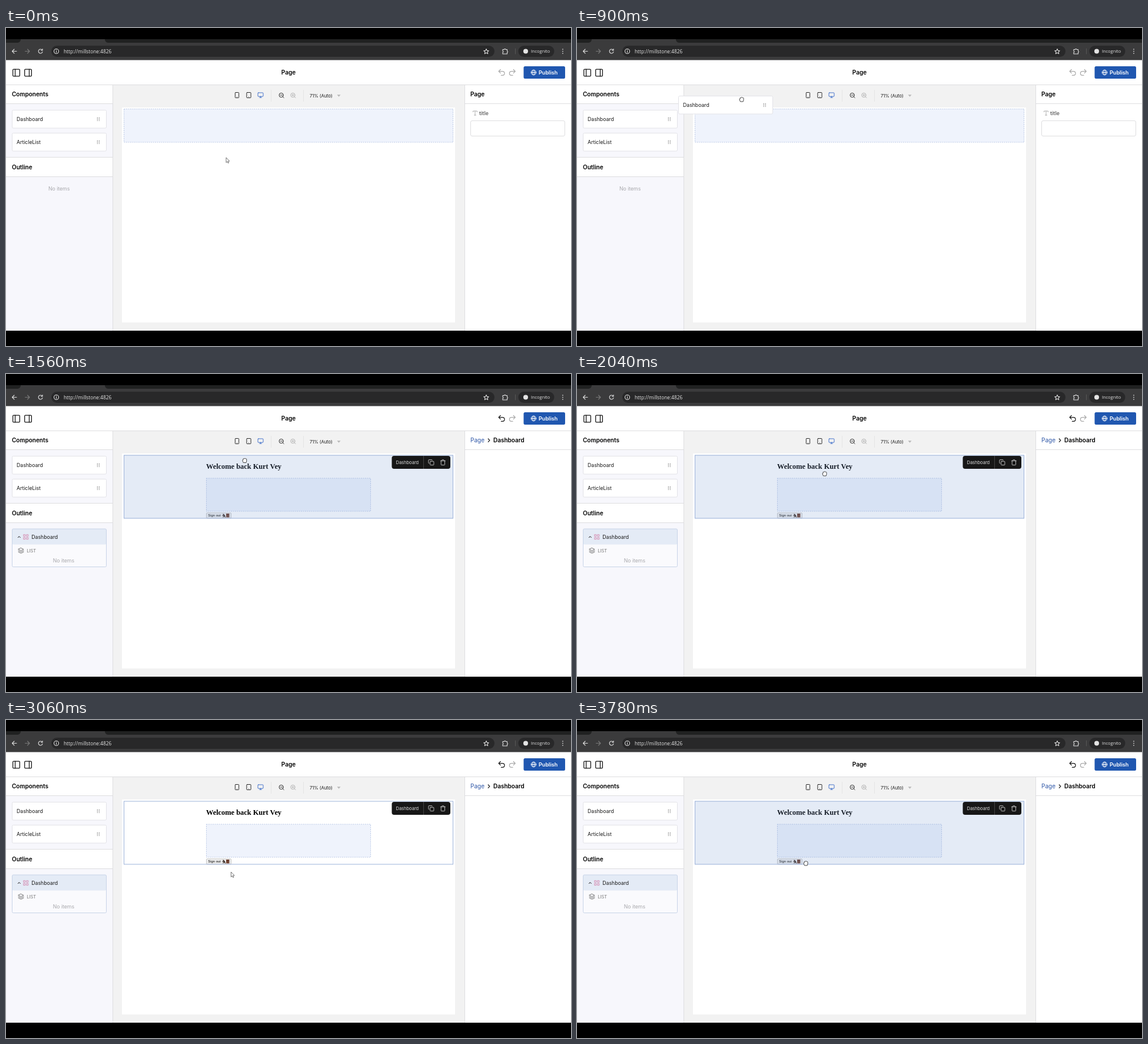
Write an HTML page that moves like this. It is 960x540 px and loops after 4.29 s.

```html
<!DOCTYPE html>
<html lang="en">
<head>
<meta charset="utf-8">
<title>Page editor</title>
<style>
  html, body { margin: 0; width: 100%; height: 100%; overflow: hidden; background: #000; }
  svg { display: block; width: 960px; height: 540px; }
  text { font: 400 8.7px Inter, sans-serif; fill: #181818; white-space: pre; }
  .head { font-size: 10px; font-weight: 600; fill: #000; }
  .small { font-size: 7.5px; }
  .chrome { font: 8.3px "Open Sans", sans-serif; fill: #e4e4e4; }
  .soft { fill: #a8a8ac; }
  .icon { fill: none; stroke: #181818; stroke-width: 2; stroke-linecap: round; stroke-linejoin: round; }
  .card rect { fill: #fff; stroke: #e3e3e8; }
  .zone { fill: #eff3fc; stroke: #bccae6; stroke-dasharray: 2 1.5; }
</style>
</head>
<body>
<svg viewBox="0 0 960 540">
  <defs>
    <path id="grip" d="M0 0h0M3 0h0M0 2.4h0M3 2.4h0M0 4.8h0M3 4.8h0" fill="none" stroke="#555" stroke-width="1.3" stroke-linecap="round"/>
    <path id="back" d="M9 14 4 9l5-5M4 9h10.5a5.5 5.5 0 0 1 0 11H11"/>
    <path id="lens" d="M19 11a8 8 0 1 1-16 0a8 8 0 1 1 16 0M21 21l-4.3-4.3M8 11h6"/>
  </defs>

  <!-- browser bar -->
  <rect width="960" height="540"/>
  <rect y="19" width="960" height="8" fill="#202121"/>
  <path d="M20 25q5-1 5-6h143q0 5 5 6z" fill="#3b3b3c"/>
  <rect y="25" width="960" height="30" fill="#3b3b3c"/>
  <rect x="77" y="30" width="753" height="19" rx="9.5" fill="#282829"/>
  <rect x="870.500" y="30" width="61" height="19" rx="9.5" fill="#282829"/>
  <g class="icon" style="stroke:#ddd;stroke-width:1.1">
    <path d="M18 39.500h-7.500m3.500-3.500l-3.500 3.500l3.500 3.500"/>
    <path d="M32.500 39.500h7.500m-3.500-3.500l3.500 3.500l-3.500 3.500" stroke="#777"/>
    <path d="M61.500 37.500a3.500 3.500 0 1 0 .5 3M62 35.500v2.500h-2.500"/>
    <circle cx="85.500" cy="39.500" r="4"/>
    <path d="M85.500 39v2.500M85.500 37.300v.1"/>
    <path d="M816 35.500l1.300 2.900 3 .3-2.300 2 .7 3-2.700-1.600-2.700 1.600.7-3-2.300-2 3-.3z"/>
    <path d="M844 36.500h2.500a1.300 1.300 0 0 1 2.500 0h2.500v2.500a1.300 1.300 0 0 1 0 2.500v2.500h-7.500v-2.500a1.300 1.300 0 0 0 0-2.500z"/>
    <path d="M865.500 35v9" stroke="#555"/>
    <path d="M946 36v.1M946 39.500v.1M946 43v.1" stroke-width="1.700"/>
  </g>
  <circle cx="883" cy="39.500" r="4" fill="#e4e4e4"/>
  <text class="chrome" x="98" y="42.700">http://millstone:4826</text>
  <text class="chrome" x="892" y="42.300" style="font-size:7.400px">Incognito</text>

  <!-- editor frame -->
  <rect y="54.500" width="960" height="459.500" fill="#fff"/>
  <rect y="97" width="181" height="417" fill="#f7f7fc"/>
  <rect x="181" y="97" width="599" height="417" fill="#f2f2f2"/>
  <rect x="197" y="135" width="566" height="365" fill="#fff"/>
  <path d="M0 97h181v31H0zM0 220h181v32H0z" fill="#fff"/>
  <path d="M0 96.500h960M0 128.500h181M0 219.500h181M0 252.500h181M181.500 97v417M779.500 97v417M780 128.500h180" stroke="#dedee0"/>
  <g class="icon" transform="translate(9.700 68.200) scale(.65)">
    <rect x="3" y="3" width="18" height="18" rx="2"/><path d="M9 3v18"/>
    <g transform="translate(30.800)"><rect x="3" y="3" width="18" height="18" rx="2"/><path d="M15 3v18"/></g>
  </g>
  <text class="head" x="480" y="78.700" text-anchor="middle">Page</text>
  <g class="icon" transform="translate(834.600 68) scale(.62)"><use id="undo" href="#back"/></g>
  <g class="icon" transform="translate(867.800 68) scale(-.62 .62)" style="stroke:#aaa"><use href="#back"/></g>
  <rect x="879.500" y="65" width="70.500" height="21" rx="2.500" fill="#2057b0"/>
  <g class="icon" style="stroke:#fff;stroke-width:1"><circle cx="896.500" cy="75.500" r="4.200"/><ellipse cx="896.500" cy="75.500" rx="1.800" ry="4.200"/><path d="M892.300 75.500h8.400"/></g>
  <text x="905" y="78.800" style="font-size:9.100px;font-weight:600;fill:#fff">Publish</text>

  <text class="head" x="10" y="116.200">Components</text>
  <text class="head" x="10" y="239.700">Outline</text>
  <g id="card" class="card">
    <rect x="10.500" y="139.500" width="160" height="30.500" rx="2"/>
    <text x="18" y="158.200">Dashboard</text>
    <use href="#grip" x="155.300" y="152.300"/>
  </g>
  <g class="card">
    <rect x="10.500" y="178.500" width="160" height="30.500" rx="2"/>
    <text x="18" y="197.200">ArticleList</text>
    <use href="#grip" x="155.300" y="191.300"/>
  </g>

  <!-- viewport controls -->
  <g class="icon" transform="translate(387.100 108.600) scale(.45)">
    <rect x="5" y="2" width="14" height="20" rx="2"/><path d="M12 18h.01"/>
    <g transform="translate(44.400)"><rect x="4" y="2" width="16" height="20" rx="2"/><path d="M12 18h.01"/></g>
    <g transform="translate(88.900)" stroke="#3668c8"><rect x="2" y="3" width="20" height="14" rx="2"/><path d="M8 21h8M12 17v4"/></g>
    <use href="#lens" x="168" y="1"/>
    <g stroke="#aaa"><use href="#lens" x="212" y="1"/><path d="M223 9v6"/></g>
  </g>
  <path d="M450.500 105v20M505.500 105v20" stroke="#e4e4e4"/>
  <text class="small" x="516" y="117.500">71% (Auto)</text>
  <path d="M562.500 113.200h6l-3 3.500z" fill="#b8b8b8"/>

  <!-- empty page -->
  <g id="empty">
    <rect class="zone" x="200.500" y="137.500" width="559" height="56.500"/>
    <text class="soft" x="72" y="276.200">No items</text>
    <text class="head" x="789" y="116.200">Page</text>
    <path d="M793.500 142.500v-1.500h7v1.500M797 141v7M795.500 148h3" class="icon" style="stroke:#aaa;stroke-width:.9"/>
    <text x="804" y="147.500" style="font-weight:600;fill:#666">title</text>
    <rect x="789.500" y="157.500" width="160" height="26" rx="2.500" fill="#fff" stroke="#dedee0"/>
  </g>

  <!-- page with the dropped component -->
  <g id="filled">
    <text x="340" y="161" style="font:bold 12.370px 'Liberation Serif',serif;fill:#000">Welcome back Kurt Vey</text>
    <rect class="zone" x="340.500" y="177" width="279" height="56"/>
    <rect x="340.500" y="235.800" width="42" height="9" rx="1" fill="#efefef" stroke="#b5b5b5" stroke-width=".7"/>
    <text x="343.300" y="242.400" style="font:5.900px 'Liberation Sans',sans-serif;fill:#000">Sign out</text>
    <path d="M369 238l1.500 1 1.500 2M370 239l-2 1.500M370.500 240l-1.500 3M370.500 241l2 2" class="icon" style="stroke:#3a2d28;stroke-width:1.200"/>
    <rect x="374" y="237" width="5.500" height="6.500" fill="#7b4a38"/>
    <path d="M375.500 238.500h2.500M375.500 241h2.500" stroke="#4f2c22"/>
    <rect id="hover" x="200" y="137.500" width="560" height="108" fill="rgb(120,155,210)" fill-opacity=".2"/>
    <rect x="200.500" y="138" width="559" height="107" fill="none" stroke="#9db3da"/>

    <rect x="655.500" y="139" width="99.500" height="22" rx="4" fill="#171717"/>
    <path d="M709.500 139v22" stroke="#444"/>
    <text class="small" x="662.500" y="152.700" style="fill:#ddd">Dashboard</text>
    <g class="icon" style="stroke:#ccc" transform="translate(717 144.700) scale(.45)">
      <rect x="8" y="8" width="14" height="14" rx="2"/><path d="M4 16a2 2 0 0 1-2-2V4a2 2 0 0 1 2-2h10a2 2 0 0 1 2 2"/>
      <path transform="translate(44.400)" d="M3 6h18M19 6v14a2 2 0 0 1-2 2H7a2 2 0 0 1-2-2V6M8 6V4a2 2 0 0 1 2-2h4a2 2 0 0 1 2 2v2"/>
    </g>

    <rect x="10.500" y="263" width="160" height="64.500" rx="2" fill="#fafafd"/>
    <rect x="10.500" y="263" width="160" height="26.500" rx="2" fill="#e4ebf6"/>
    <rect x="10.500" y="263" width="160" height="64.500" rx="2" fill="none" stroke="#c8d4e8"/>
    <path d="M20.300 277.700l2-2 2 2" class="icon" style="stroke-width:1"/>
    <path d="M29.700 272.700h3v3h-3zM34.700 272.700h3v3h-3zM29.700 277.700h3v3h-3zM34.700 277.700h3v3h-3z" fill="none" stroke="#d58bb0" stroke-width=".9"/>
    <text x="43.300" y="279.500">Dashboard</text>
    <path d="M25.500 295.500l4.500 2.200-4.500 2.200-4.500-2.200zM21 300l4.500 2.200 4.500-2.200M21 302.200l4.500 2.200 4.500-2.200" class="icon" style="stroke:#666;stroke-width:.9"/>
    <text class="small" x="35.300" y="303.400" style="fill:#777">LIST</text>
    <text class="soft" x="79.700" y="320.200">No items</text>

    <text x="789" y="116.200" style="font-size:10px;fill:#3058a8">Page</text>
    <path d="M819.300 110l2.500 2.700-2.500 2.700" class="icon" style="stroke-width:1.200"/>
    <text class="head" x="828" y="116.200">Dashboard</text>
  </g>

  <use id="drag" href="#card"/>
  <path id="arrow" d="M0 0v8.500l2-1.700 1.300 2.700 1.300-.6-1.300-2.600 2.500-.2z" fill="#fff" stroke="#555" stroke-width=".8"/>
  <path id="hand" d="M-2.500 4L-3.800.8q-.6-1.500.9-1.200V-2.400q.8-1 1.400 0q.6-1.600 1.500-.5q1-.9 1.500.4q1.200-.6 1.500.7V1.500L2.200 4z" fill="#fff" stroke="#333" stroke-width=".9" stroke-linejoin="round"/>
</svg>
<script>
const LOOP = 4290, STEP = 30, GRAB = 600, DROP = 1140, SAVED = 1410;
// pointer stops: time, x, y
const stops = [
  [60, 374, 220], [570, 118, 145], [GRAB, 118, 145], [900, 280, 121], [1110, 296, 134],
  [1350, 296, 134], [1650, 436, 150], [2040, 421, 169], [2100, 421, 169], [2190, 466, 171],
  [2460, 417, 171], [2610, 417, 171], [2760, 404, 214], [2940, 392, 258], [3120, 379, 258],
  [3360, 381, 245], [3660, 377, 219], [3780, 389, 243]
];
const el = id => document.getElementById(id);
const show = (id, on) => el(id).style.display = on ? "" : "none";
const place = (id, x, y) => el(id).setAttribute("transform", `translate(${x} ${y})`);
const inside = (x, y, l, t, r, b) => x >= l && x <= r && y >= t && y <= b;

function pointer(t) {
  const i = stops.findIndex(s => s[0] >= t);
  if (i < 0) return stops.at(-1).slice(1);
  if (i === 0) return stops[0].slice(1);
  const [t0, x0, y0] = stops[i - 1], [t1, x1, y1] = stops[i];
  const k = (t - t0) / (t1 - t0), e = k * k * (3 - 2 * k);
  return [x0 + (x1 - x0) * e, y0 + (y1 - y0) * e];
}

function draw(now) {
  const t = Math.floor(now % LOOP / STEP) * STEP;
  const [x, y] = pointer(t);
  const dragging = t >= GRAB && t < DROP, dropped = t >= DROP;
  const over = dropped && inside(x, y, 200, 138, 760, 245.5);
  const hand = dragging || over || (!dropped && inside(x, y, 10, 139, 171, 170));

  show("empty", !dropped);
  show("filled", dropped);
  show("hover", over);
  show("drag", dragging);
  show("hand", hand);
  show("arrow", !hand);
  el("undo").style.stroke = t >= SAVED ? "#181818" : "#aaa";
  place("drag", x - 118, y - 145);
  place("hand", x, y);
  place("arrow", x, y);
}

const start = performance.now();
function tick() {
  draw(performance.now() - start);
  requestAnimationFrame(tick);
}
tick();
</script>
</body>
</html>
```
